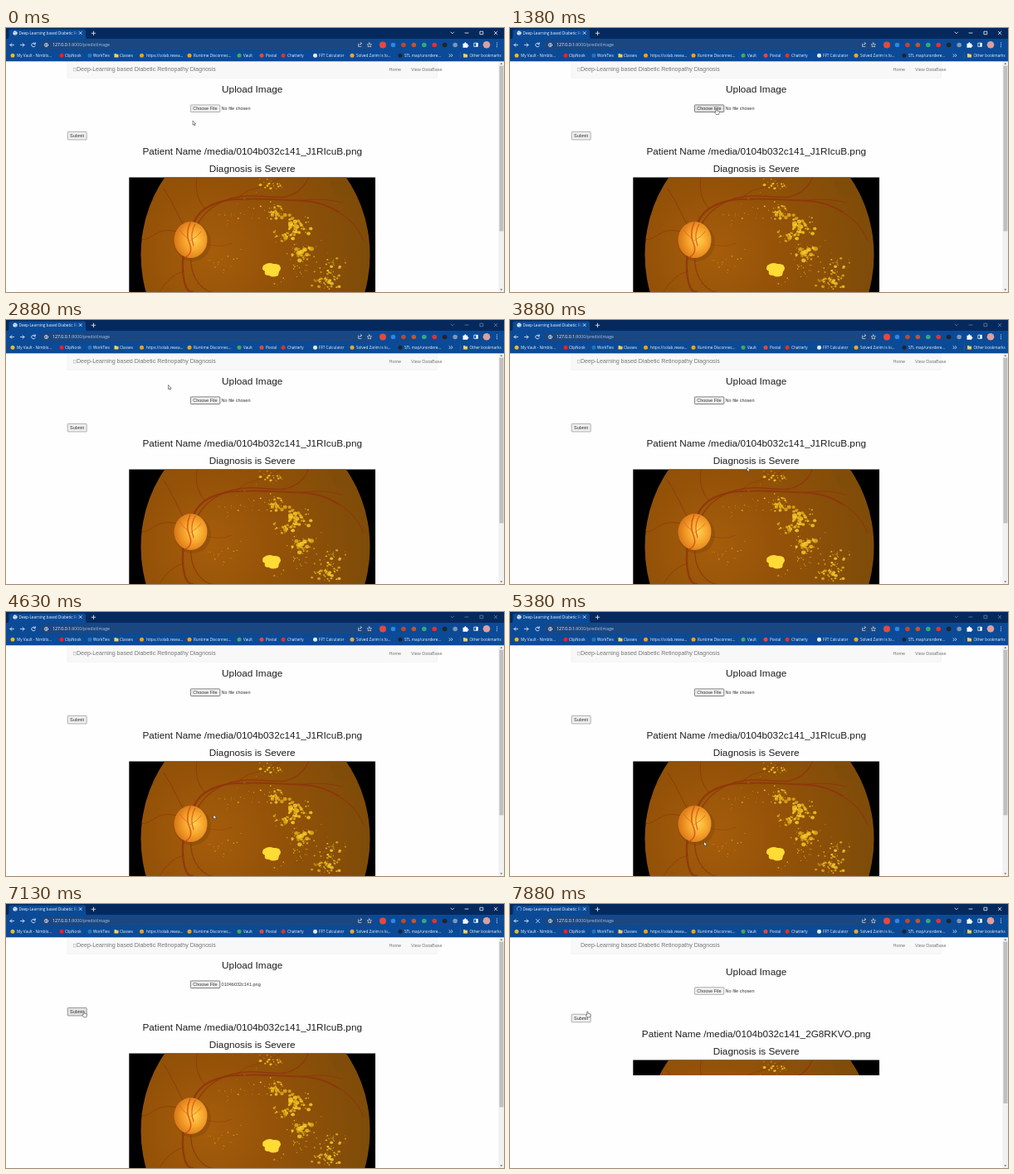
These frames come from a looping animation (600x319 px, 8000 ms). An HTML page:

```html
<!DOCTYPE html>
<html lang="en">
<head>
<meta charset="utf-8">
<title>Retinopathy diagnosis page</title>
<style>
  html, body { margin: 0; width: 100%; height: 100%; overflow: hidden; background: #fff; }
  svg { display: block; width: 100vw; height: 100vh; }
  text { white-space: pre; }
  .ui text { font: 4.65px "Open Sans", "Noto Sans", sans-serif; fill: #f2f6fb; }
  .ui .url { font-size: 5.2px; fill: #a9c4e8; }
  .ui .host { fill: #fff; }
  .page text { font: 5.5px "Liberation Sans", Arial, sans-serif; fill: #333; }
  .page .heading { font-size: 11.75px; text-anchor: middle; fill: #1e1e1e; }
  .page .brand { font-size: 7.06px; fill: #777; }
  .page .link { fill: #777; }
  .line { fill: none; stroke: #fff; stroke-width: .75; stroke-linecap: round; stroke-linejoin: round; }
  .button { fill: #efefef; stroke: #808080; stroke-width: .6; }
  .button.hover { fill: #e2e2e2; stroke: #5c5c5c; }
  .button.focus { stroke: #4c4c4c; stroke-width: .7; }
  .vessel { fill: none; stroke: #8f330d; stroke-linecap: round; stroke-linejoin: round; }
  #discVessels .vessel { stroke: #d2431b; }
  #spinner { transform-origin: 11px 6px; }
  .inactive { opacity: .42; }
</style>
</head>
<body>
<svg viewBox="0 0 600 319" preserveAspectRatio="none">
  <defs>
    <radialGradient id="fundus" gradientUnits="userSpaceOnUse" cx="245" cy="270" r="205">
      <stop offset="0" stop-color="#a65d0b"/>
      <stop offset=".4" stop-color="#945208"/>
      <stop offset="1" stop-color="#7c4b09"/>
    </radialGradient>
    <radialGradient id="disc" cx=".6" cy=".5" r=".6">
      <stop offset="0" stop-color="#ffd24e"/>
      <stop offset=".5" stop-color="#f6a42c"/>
      <stop offset="1" stop-color="#d97517"/>
    </radialGradient>
    <linearGradient id="tabFade">
      <stop offset=".9" stop-color="#fff"/>
      <stop offset="1" stop-color="#fff" stop-opacity="0"/>
    </linearGradient>
    <filter id="soft"><feGaussianBlur stdDeviation=".5"/></filter>
    <mask id="tabMask"><rect x="14" width="73" height="13" fill="url(#tabFade)"/></mask>
    <clipPath id="photoClip"><rect id="photoWindow" x="148.300" y="180.600" width="296.700" height="138.400"/></clipPath>
  </defs>

  <rect width="600" height="319" fill="#fefefe"/>

  <g class="page">
    <rect x="74" y="38" width="445.5" height="22.4" fill="#f8f8f8" stroke="#e9e9e9" stroke-width=".4"/>
    <rect id="glyph" x="81.3" y="48.2" width="2.8" height="3.8" fill="none" stroke="#999" stroke-width=".4"/>
    <text class="brand" x="85" y="52.4">Deep-Learning based Diabetic Retinopathy Diagnosis</text>
    <text class="link" x="461.5" y="52">Home</text>
    <text class="link" x="488" y="52">View DataBase</text>

    <g id="content">
      <text class="heading" x="296.7" y="78.2">Upload Image</text>
      <rect id="choose" class="button" x="222.4" y="92.9" width="35.4" height="8.6" rx=".8"/>
      <text x="225.2" y="99">Choose File</text>
      <text id="fileName" x="259.6" y="99"></text>
      <rect id="submit" class="button" x="74.2" y="125.4" width="23" height="9.6" rx=".8"/>
      <text x="77" y="132.1">Submit</text>
      <text id="patient" class="heading" x="296.7" y="153.2"></text>
      <text class="heading" x="296.7" y="174">Diagnosis is Severe</text>
      <g clip-path="url(#photoClip)">
        <rect x="148" y="180" width="297" height="139"/>
        <g filter="url(#soft)">
          <ellipse cx="300.5" cy="274" rx="138" ry="153" fill="url(#fundus)"/>
          <path d="M391 184L402 187 408 185 414 192 409 203 396 200Z" fill="#7f4c09"/>
          <g id="vessels"></g>
          <ellipse cx="225" cy="259" rx="22" ry="23" fill="#7a430a" opacity=".35"/>
          <ellipse cx="222.5" cy="256" rx="20" ry="22" fill="url(#disc)"/>
          <g id="discVessels"></g>
          <g id="deposits"></g>
        </g>
      </g>
    </g>

    <rect x="593.4" y="40" width="6.6" height="279" fill="#f1f1f1"/>
    <rect id="thumb" x="594.4" y="45.5" width="5" height="200" fill="#bfbfbf"/>
    <path d="M595.3 43.8l1.5-1.8 1.5 1.8zM595.3 315.5l1.5 1.8 1.5-1.8z" fill="#666"/>
  </g>

  <g class="ui">
    <rect width="600" height="14" fill="#05295c"/>
    <path d="M0 13.5Q3.500 13.500 3.500 10V3.500Q3.500 1.500 6 1.500H93.500Q96 1.500 96 4V10Q96 13.500 99 13.500Z" fill="#0b4a96"/>
    <rect y="13" width="600" height="27.3" fill="#0b4a96"/>
    <rect x="41" y="15" width="402" height="11" rx="5.5" fill="#1b4780"/>
    <g id="favicon">
      <circle cx="11" cy="6" r="2.6" fill="#e7eff9"/>
      <path d="M9 5.300q2 1.200 3.800-.7M10 8q1.500-1.200 2.700-.3" class="line" style="stroke:#4379b8;stroke-width:.6"/>
    </g>
    <path id="spinner" class="line" d="M11 3.300A2.700 2.700 0 1 1 8.300 6" style="stroke:#78adf0"/>
    <text x="15.500" y="7.900" mask="url(#tabMask)">Deep-Learning based Diabetic Retinopathy</text>
    <path class="line" d="M88.200 4.500l3 3m0-3l-3 3M105.500 4v4.600m-2.300-2.300h4.600"/>
    <g id="controls">
      <path class="line" d="M536 5l1.800 1.800 1.800-1.800M553 6h4M571.300 4.200h3.500v3.500h-3.500zM588.300 4.200l3.600 3.600m0-3.600l-3.600 3.600"/>
    </g>
    <path class="line" d="M9.500 20.500H5m2-2l-2 2 2 2"/>
    <path class="line" d="M17.500 20.500H22m-2-2l2 2-2 2"/>
    <path id="reload" class="line" d="M35 19.200a2.300 2.300 0 1 0 .2 2.300M35.300 17.700v1.800h-1.800"/>
    <path id="stop" class="line" d="M31.500 18.500l4 4m0-4l-4 4"/>
    <circle class="line" cx="48.500" cy="20.500" r="2.100"/>
    <path class="line" d="M48.500 20.300v1.200M48.500 19.300v.1"/>
    <text class="url" x="56" y="22.300"><tspan class="host">127.0.0.1</tspan>:8000/predictImage</text>
    <path class="line" d="M424.500 19v3.500h3.500m-2.300-1.700q.4-2.200 2.800-2.200m-1.300-1.300l1.300 1.300-1.300 1.300M437.800 17.900l.8 1.700 1.900.2-1.400 1.300.4 1.900-1.700-1-1.700 1 .4-1.900-1.400-1.300 1.900-.2z" style="stroke-width:.55"/>
    <g id="extensions"></g>
    <path d="M550.500 18.800h1.700q0-1.500 1.200-1.500t1.200 1.500h1.600v1.600q1.300 0 1.300 1t-1.300 1.100v1.200h-5.700z" fill="#fff"/>
    <rect class="line" x="564.200" y="18.200" width="4.200" height="4.200"/>
    <path d="M566.300 18.200h2.100v4.200h-2.100z" fill="#fff"/>
    <circle cx="579" cy="20.300" r="4.300" fill="#dca09d"/>
    <path d="M591.500 18v.1m0 2.200v.1m0 2.200v.1" class="line" style="stroke-width:1"/>
    <g id="bookmarks"></g>
    <path class="line" d="M534 31.700l1.500 1.500-1.500 1.500m2.500-3l1.500 1.500-1.500 1.500"/>
    <path d="M547.500 29.500v7" class="line" style="stroke:#3f73b3;stroke-width:.4"/>
  </g>

  <g id="cursor" stroke="#222" stroke-width=".5" fill="#fff" stroke-linejoin="round">
    <path id="arrow" d="M0 0V5.200L1.200 4.100 2 6 2.900 5.600 2.100 3.800H3.700Z"/>
    <path id="hand" d="M-.6 .4Q0-.4 .6 .4V2.500L3 3Q3.900 3.200 3.700 4.200L3.100 7H-.1L-2 4.500Q-1.900 3.500-.6 4.300Z"/>
  </g>
</svg>

<script>
const $ = id => document.getElementById(id);
const LOOP = 8000, STEP = 125;
const OPEN_DIALOG = 1750, FILE_PICKED = 5625, SUBMIT = 7250, NEW_PAGE = 7850;

function add(parent, name, attrs, text = "") {
  const node = document.createElementNS("http://www.w3.org/2000/svg", name);
  for (const key in attrs) node.setAttribute(key, attrs[key]);
  node.textContent = text;
  parent.append(node);
}

// Icon x, text offset, icon colour, label
const bookmarks = [
  [8, 5, "#e6b62e", "My Vault - Nimblo..."],
  [67, 4, "#ee2020", "ClipNook"],
  [101, 4, "#2477bb", "WorkTies"],
  [133, 4, "folder", "Classes"],
  [163.5, 5.5, "#f0a020", "https://colab.resea..."],
  [221, 5, "#f0a020", "Runtime Disconnec..."],
  [281, 5, "#45a85a", "Vault"],
  [308, 5, "#e0493d", "Postal"],
  [334, 5, "#d8352b", "Chatterly"],
  [372.5, 4.5, "#e8eef7", "FFT Calculator"],
  [417, 5, "#eda634", "Solved Zarim is lo..."],
  [475, 5, "#20242a", "STL map/unordere..."],
  [553.5, 5, "folder", "Other bookmarks"]
];
for (const [x, gap, color, label] of bookmarks) {
  if (color === "folder") add($("bookmarks"), "path", { d: `M${x - 2.5} 31h2l.7.8h2.3v3.8h-5z`, fill: "#f5cf68" });
  else add($("bookmarks"), "circle", { cx: x, cy: 33.3, r: 2.5, fill: color });
  add($("bookmarks"), "text", { x: x + gap, y: 35 }, label);
}

["#e8483c", "#2f86e0", "#bf482b", "#c2542f", "#35a67a", "#e5322d", "#20242a", "#8095b5"].forEach((fill, i) =>
  add($("extensions"), "circle", { cx: 454 + i * 12.45, cy: 20.5, r: i ? 2.8 : 4, fill }));

const vessel = (d, width, parent = "vessels", opacity = .8) =>
  add($(parent), "path", { d, class: "vessel", "stroke-width": width, opacity });
vessel("M222 252Q224 230 239 219T278 207T322 207T361 209T400 222", 2.2);
vessel("M398 221Q421 233 431 257", 1.1);
vessel("M226 250Q232 227 253 214T302 203T337 204Q358 198 364 181", 1.3);
vessel("M216 262Q211 284 214 302T225 319", 2.3);
vessel("M224 264Q220 287 228 302T248 319", 1.2);
vessel("M219 247Q210 232 204 219T190 194", 1);
vessel("M212 248Q192 240 178 250T163 253", .8);
vessel("M240 219Q226 203 230 181", .9);
vessel("M278 207Q286 197 300 194T331 181", .7);
vessel("M358 208Q384 205 405 211", 1);
vessel("M214 294Q196 299 185 319", .8);
vessel("M237 260Q258 267 272 260", .5);
vessel("M222 235Q216 248 221 260T216 277", 1.5, "discVessels");
vessel("M228 237Q221 249 226 263", 1.1, "discVessels");
vessel("M220 255Q213 250 209 244M222 257Q231 252 235 246", .7, "discVessels", .75);

let seed = 17;
const random = () => (seed = seed * 16807 % 2147483647) / 2147483647;
const spread = () => random() + random() + random() - 1.5;

// Centre x, y, horizontal and vertical reach, count, largest radius
const clusters = [
  [324, 223, 13, 10, 45, 2.6],
  [352, 239, 13, 11, 55, 3],
  [338, 252, 13, 8, 34, 2.6],
  [356, 271, 14, 9, 45, 2.7],
  [396, 287, 16, 15, 38, 2],
  [385, 306, 15, 10, 38, 2.5],
  [322, 189, 18, 8, 26, 1.7],
  [284, 222, 32, 17, 20, .8],
  [259, 285, 22, 22, 14, .7],
  [358, 285, 34, 32, 36, 1]
];
for (const [x, y, w, h, count, size] of clusters)
  for (let i = 0; i < count; i++) {
    const r = .35 + random() * random() * size;
    add($("deposits"), "ellipse", {
      cx: x + spread() * w, cy: y + spread() * h, rx: r * 1.15, ry: r,
      fill: random() < .5 ? "#e0ac1a" : "#f3c928", opacity: .85
    });
  }
add($("deposits"), "path", {
  d: "M310 287Q316 282 322 285Q331 284 331 291Q328 295 328 299Q321 302 317 299Q310 299 312 294Q307 292 310 287Z",
  fill: "#ffdb35"
});

// Time, x, y of the pointer tip
const path = [
  [0, 225, 112], [375, 225, 112], [1000, 246, 99], [1375, 248.5, 97.5],
  [1625, 248.5, 97.5], [2375, 210, 84], [2875, 195.5, 78.5],
  [3875, 285.5, 178], [4625, 250, 245], [5375, 233.8, 277.5],
  [5625, 233.8, 277.5], [6125, 150, 185], [6625, 112, 147],
  [6875, 94.5, 131], [7125, 93.8, 129.8], [8000, 93.3, 129.8]
];
function pointerAt(t) {
  const i = path.findIndex(p => p[0] > t);
  const [t0, x0, y0] = path[i - 1], [t1, x1, y1] = path[i];
  const k = (t - t0) / (t1 - t0);
  return [x0 + (x1 - x0) * k, y0 + (y1 - y0) * k];
}

const show = (id, on) => $(id).style.display = on ? "" : "none";
const between = (t, from, to) => t >= from && t < to;

function render(t) {
  const loaded = t >= NEW_PAGE, loading = t >= SUBMIT;
  const hoverChoose = between(t, 1000, OPEN_DIALOG);
  const hoverSubmit = t >= 6875;

  $("cursor").setAttribute("transform", `translate(${pointerAt(Math.floor(t / STEP) * STEP)})`);
  show("hand", hoverChoose || hoverSubmit);
  show("arrow", !hoverChoose && !hoverSubmit);

  $("choose").classList.toggle("hover", hoverChoose);
  $("choose").classList.toggle("focus", between(t, 1375, SUBMIT));
  $("submit").classList.toggle("hover", hoverSubmit && !loaded);
  $("controls").classList.toggle("inactive", between(t, OPEN_DIALOG, FILE_PICKED));

  $("fileName").textContent = between(t, FILE_PICKED, NEW_PAGE) ? "0104b032c141.png" : "No file chosen";
  $("patient").textContent = `Patient Name /media/0104b032c141_${loaded ? "2G8RKVO" : "J1RIcuB"}.png`;
  $("content").setAttribute("transform", `translate(0 ${loaded ? 7.8 : 0})`);
  $("photoWindow").setAttribute("height", loaded ? 18.6 : 138.4);
  $("thumb").setAttribute("height", loaded ? 195.5 : 200);

  show("glyph", !loaded);
  show("favicon", !loading);
  show("spinner", loading);
  show("reload", !loading);
  show("stop", loading);
  $("spinner").style.transform = `rotate(${(t - SUBMIT) * .36}deg)`;
}

const start = performance.now();
function tick() {
  render((performance.now() - start) % LOOP);
  requestAnimationFrame(tick);
}
tick();
</script>
</body>
</html>
```
